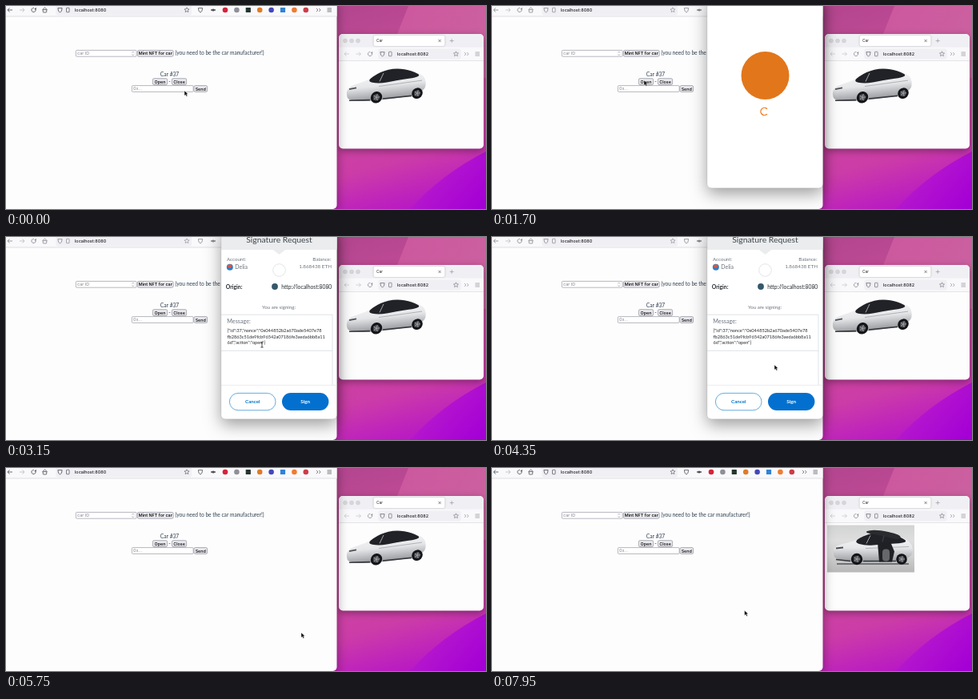
Animation of 600 by 254 pixels, one loop 8000 ms. Source, as an HTML page with a canvas:

```html
<!DOCTYPE html>
<html lang="en">
<head>
<meta charset="utf-8">
<title>Car door demo</title>
<style>
html, body { margin: 0; width: 100%; height: 100%; overflow: hidden; background: #fdfdfd; }
canvas { display: block; width: 600px; height: 254px; }
</style>
</head>
<body>
<canvas id="stage"></canvas>
<script>
const W = 600, H = 254, LOOP = 8000, STEP = 50;
const UI = 'Inter, "Liberation Sans", sans-serif';
const ROUND = 'Lato, "Open Sans", sans-serif';
const POPUP_AT = 1300, REQUEST_AT = 1950, SIGNED_AT = 5450, OPEN_AT = 6400;
const canvas = document.getElementById('stage');
const g = canvas.getContext('2d');
const dpr = window.devicePixelRatio || 1;
canvas.width = W * dpr;
canvas.height = H * dpr;

// The pointer glides to each stop between the two times
const START = { x: 223, y: 106 };
const GLIDES = [
  { from: 200, to: 750, x: 190, y: 93 },
  { from: 1750, to: 2900, x: 320, y: 135 },
  { from: 3400, to: 4150, x: 353, y: 160 },
  { from: 4400, to: 5000, x: 369, y: 206 },
  { from: 7200, to: 8000, x: 315, y: 178 }
];

function shape(fill, stroke, width = 0.7) {
  if (fill) { g.fillStyle = fill; g.fill(); }
  if (stroke) { g.strokeStyle = stroke; g.lineWidth = width; g.stroke(); }
}

function box(x, y, w, h, r, fill, stroke, width) {
  g.beginPath();
  g.roundRect(x, y, w, h, r);
  shape(fill, stroke, width);
}

function disc(x, y, r, fill, stroke, width) {
  g.beginPath();
  g.arc(x, y, r, 0, Math.PI * 2);
  shape(fill, stroke, width);
}

function poly(points, fill) {
  g.beginPath();
  points.forEach(([x, y]) => g.lineTo(x, y));
  g.closePath();
  shape(fill);
}

// Closed curve through the midpoints of a polygon
function blob(points, fill) {
  const n = points.length;
  const mid = i => [0, 1].map(k => (points[i % n][k] + points[(i + 1) % n][k]) / 2);
  g.beginPath();
  g.moveTo(...mid(0));
  for (let i = 1; i <= n; i++) g.quadraticCurveTo(...points[i % n], ...mid(i));
  shape(fill);
}

function line(color, width, ...points) {
  g.beginPath();
  points.forEach(([x, y]) => g.lineTo(x, y));
  shape(null, color, width);
}

function text(str, x, y, size, color, family = UI, weight = 400, align = 'left') {
  g.font = `${weight} ${size}px ${family}`;
  g.fillStyle = color;
  g.textAlign = align;
  g.fillText(str, x, y);
}

function shadowed(alpha, blur, dy, draw) {
  g.save();
  g.shadowColor = `rgba(0,0,0,${alpha})`;
  g.shadowBlur = blur * dpr;
  g.shadowOffsetY = dy * dpr;
  draw();
  g.restore();
}

function fade(x0, y0, x1, y1, ...colors) {
  const grad = g.createLinearGradient(x0, y0, x1, y1);
  colors.forEach((c, i) => grad.addColorStop(i / (colors.length - 1), c));
  return grad;
}

function wallpaper() {
  g.fillStyle = fade(450, 0, 520, 254, '#b4468f', '#c24c97', '#cd489e', '#cc3ca8', '#b716c6');
  g.fillRect(405, 0, 195, H);
  poly([[503, 0], [W, 0], [W, 90], [467, 90]], fade(490, 0, W, 40, '#cc589e', '#cb609f'));
  g.beginPath();
  g.moveTo(W, 182);
  g.quadraticCurveTo(545, 210, 505, H);
  g.lineTo(W, H);
  shape(fade(530, 200, 590, H, '#b81bcb', '#a400d6'));
}

function arrow(x, y, dir, color) {
  line(color, 0.8, [x - 3, y], [x + 3, y]);
  line(color, 0.8, [x + dir * 0.5, y - 2.5], [x + dir * 3, y], [x + dir * 0.5, y + 2.5]);
}

function reload(x, y, color) {
  g.beginPath();
  g.arc(x, y, 2.6, -0.4, 4.9);
  shape(null, color, 0.8);
  poly([[x + 0.8, y - 1], [x + 3.2, y - 3.2], [x + 3.2, y - 0.6]], color);
}

function shield(x, y, color) {
  g.beginPath();
  g.moveTo(x - 2.6, y - 2.4);
  g.lineTo(x + 2.6, y - 2.4);
  g.quadraticCurveTo(x + 2.6, y + 2, x, y + 3.2);
  g.quadraticCurveTo(x - 2.6, y + 2, x - 2.6, y - 2.4);
  shape(null, color, 0.8);
}

function star(x, y, color) {
  g.beginPath();
  for (let i = 0; i < 10; i++) {
    const r = i % 2 ? 1.5 : 3.2, a = i * Math.PI / 5 - Math.PI / 2;
    g.lineTo(x + r * Math.cos(a), y + r * Math.sin(a));
  }
  g.closePath();
  shape(null, color, 0.6);
}

function menu(x, y, color) {
  for (const d of [0, 3.2])
    line(color, 0.7, [x + d - 3, y - 2], [x + d - 1, y], [x + d - 3, y + 2]);
  for (const d of [-2, 0, 2]) line(color, 0.7, [x + 10.5, y + d], [x + 16, y + d]);
}

function addressBar(url, x, y, w, ink) {
  box(x, y - 6.5, w, 13, 2, '#f0f0f4');
  shield(x + 5, y, ink);
  box(x + 13, y - 2.7, 3.6, 5.4, 0.6, null, ink);
  text(url, x + 23.5, y + 2.1, 5.45, '#1c1b22', UI, 500);
  star(x + w - 6, y, ink);
}

function button(label, x, y, w) {
  box(x + 0.4, y + 0.4, w - 0.8, 7.8, 1.6, '#e9e9ed', '#8f8f9d');
  text(label, x + w / 2, y + 6.3, 5.4, '#000', UI, 500, 'center');
}

function field(hint, x, y, w) {
  box(x + 0.4, y + 0.4, w - 0.8, 7.8, 1, '#fff', '#9a9aa6');
  text(hint, x + 2, y + 6.2, 5.4, '#85858a');
}

function extensions() {
  const colors = ['#d5233b', '#8e8f97', '#25352f', '#e07a26', '#4546b8', '#2f83d6', '#f07b32', '#cd3b48'];
  colors.forEach((color, i) => {
    const x = 274 + i * 14.4;
    if (i % 3 === 2) box(x - 3.1, 1.9, 6.2, 6.2, 0.7, color);
    else disc(x, 5, 3.3, color);
  });
}

function mainWindow(t) {
  const focused = t < POPUP_AT || t >= SIGNED_AT;
  const ink = focused ? '#4b4a55' : '#85848d', dim = '#b9b9be', slate = '#2c3e50';
  shadowed(0.4, 14, 4, () => box(-10, -10, 423.5, 264, 5, '#fdfdfd'));
  box(0, 0, 413.5, 13, 0, '#f9f9fb');
  line('#d3d3d7', 0.7, [0, 13], [413.5, 13]);
  arrow(5, 5, -1, ink);
  arrow(20, 5, 1, dim);
  reload(34.5, 5, ink);
  line(ink, 0.8, [45.2, 5], [48.5, 2], [51.8, 5]);
  box(46.3, 4.6, 4.4, 3.4, 0.5, null, ink, 0.8);
  addressBar('localhost:8080', 62.5, 5, 169.5, ink);
  shield(243, 5, ink);
  line(ink, 1.4, [256, 5], [262, 5]);
  disc(259, 5, 1.6, ink);
  extensions();
  menu(391, 5, ink);

  field('car ID', 87, 55, 76.5);
  for (const d of [-1, 1])
    line('#777', 0.6, [157.5, 59.4 + d], [158.8, 59.4 + d * 2.3], [160.1, 59.4 + d]);
  button('Mint NFT for car', 164, 55, 45.5);
  text('(you need to be the car manufacturer!)', 211.5, 61.4, 6.6, slate, ROUND);
  text('Car #37', 204.5, 87.8, 6.65, slate, ROUND, 400, 'center');
  button('Open', 183, 90.3, 19);
  text('-', 204.6, 97, 6.65, slate, ROUND, 400, 'center');
  button('Close', 207, 90.3, 19);
  field('0x...', 157, 99.2, 77.5);
  button('Send', 234.5, 99.2, 17.5);
}

function wheel(x, y, r) {
  disc(x, y, r, '#131417');
  disc(x, y, r * 0.55, '#55575c');
  for (let i = 0; i < 5; i++) {
    const a = i * Math.PI * 0.4;
    line('#b5b7ba', 0.7, [x, y], [x + r * 0.6 * Math.cos(a), y + r * 0.6 * Math.sin(a)]);
  }
}

// Side view facing left: nose at x = 0, ground at y = 0
function carBody(front, rear) {
  blob([[-1, -16], [3, -24], [28, -29], [42, -39], [62, -42], [84, -35], [100, -25], [97, -5], [40, -2], [2, -5]],
    fade(0, -38, 0, -3, '#f6f6f7', '#e6e7e9', '#97999e'));
  blob([[24, -28], [42, -38], [62, -41], [82, -35], [95, -27], [60, -25], [40, -23]], '#202227');
  line('#d9dadc', 0.7, [46, -36], [41, -26]);
  line('#8b8d92', 0.6, [40, -20], [94, -22]);
  line('#36383d', 1.6, [3, -6], [front - 8, -4]);
  line('#36383d', 1.6, [front + 8, -4], [rear - 7, -4]);
  line('#4c4f55', 1.8, [3, -20], [12, -21]);
  wheel(front, -6.5, 7.2);
  wheel(rear, -6.5, 6.8);
}

function closedCar() {
  g.save();
  g.transform(1, -0.1, 0, 1, 426, 124.5);
  carBody(37, 88);
  g.restore();
}

function openCar() {
  box(419, 71.5, 109, 59, 0, fade(0, 71, 0, 130, '#d2d3d3', '#dedede', '#d0d0d0', '#b8b8b8'));
  g.save();
  g.translate(427, 120.5);
  line('#707174', 2, [4, -0.5], [94, -0.5]);
  carBody(29, 85);
  poly([[55, -27], [71, -28], [76, -16], [73, -3], [57, -3]], '#202124');
  box(61, -19, 9, 15, 4, '#65676a');
  blob([[36, -40], [52, -44], [85, -37], [82, -30], [60, -36]], '#292b2e');
  line('#37393c', 1.4, [63, -36], [61, -28]);
  g.restore();
}

function carWindow(t) {
  const ink = '#8f8e97', dim = '#c8c8cc';
  shadowed(0.35, 10, 3, () => box(416, 35, 181, 143.5, 5, '#fdfdfd'));
  box(416, 35, 181, 17, [5, 5, 0, 0], '#f0f0f4');
  box(416, 51.5, 181, 17, 0, '#f9f9fb');
  line('#d6d6da', 0.6, [416, 68.5], [597, 68.5]);
  for (const x of [424, 432, 440]) disc(x, 43.5, 2.5, '#d7d6da', '#c5c4c9', 0.4);
  shadowed(0.3, 2, 0, () => box(459.5, 37, 89, 13, 2, '#fff'));
  text('Car', 463, 45.4, 4.8, '#24232b');
  for (const d of [-1.6, 1.6]) {
    line('#55545d', 0.7, [540.5, 43.5 - d], [543.7, 43.5 + d]);
  }
  line(ink, 0.6, [554.7, 43.5], [559.7, 43.5]);
  line(ink, 0.6, [557.2, 41], [557.2, 46]);
  arrow(426, 60, -1, dim);
  arrow(440.5, 60, 1, dim);
  reload(455, 60, ink);
  addressBar('localhost:8082', 465.5, 60, 103, '#6c6b75');
  menu(576, 60, ink);
  t < OPEN_AT ? closedCar() : openCar();
}

function loading(t) {
  disc(341.5, 87, 30, '#e2761b');
  const turn = (t - 1700) / 1000 * Math.PI * 2;
  g.beginPath();
  g.arc(340.5, 132, 4.6, turn + 0.75, turn + Math.PI * 2 - 0.75);
  shape(null, '#f07c21', 1.4);
}

function request() {
  const grey = '#6a737d', dark = '#24292e', rule = '#d2d8dd', band = '#eaecee';
  box(269, 0, 144.5, 16, 0, band);
  poly([[333.5, 15.8], [349.5, 15.8], [341.5, 22]], band);
  text('Signature Request', 341.5, 7, 10.4, '#3f454b', ROUND, 400, 'center');
  text('Account:', 276, 29.8, 6.2, grey, ROUND);
  text('Balance:', 406.5, 29.8, 6.3, grey, ROUND, 400, 'right');
  disc(279.8, 37.8, 4, '#2d7fc4');
  poly([[276, 36.5], [279.5, 33.8], [283, 36], [280, 39]], '#e2553d');
  text('Delia', 286.3, 40.4, 6.9, grey, ROUND);
  text('1.868438 ETH', 407, 38.6, 6.3, grey, ROUND, 400, 'right');
  disc(341.5, 41.5, 7.8, '#fff', '#d6d9dc');
  text('Origin:', 274.8, 64.5, 6.8, dark, ROUND, 700);
  disc(336, 62, 3.9, '#35586b');
  text('http://localhost:8080', 407.3, 64.5, 6.83, dark, ROUND, 400, 'right');
  text('You are signing:', 341, 90, 6.15, grey, ROUND, 400, 'center');
  line(rule, 0.7, [269, 97.2], [408, 97.2], [408, 185.2]);
  line(rule, 0.7, [269, 142.3], [408, 142.3]);
  line('#e3e6e9', 0.7, [269, 185.4], [413.5, 185.4]);
  text('Message:', 276.3, 108, 7.2, grey, ROUND);
  const message = [
    '{"id":37,"nonce":"0x044852b2a670ade5407e78',
    'fb2863c51de9fcb96542a07186fe3aeda6bb8a11',
    '6d","action":"open"}'
  ];
  message.forEach((row, i) => text(row, 276.5, 118.8 + i * 7.7, 5.65, dark, ROUND));
  box(279.4, 195.4, 57.6, 21.4, 10.7, '#fff', '#3d97d8', 0.8);
  text('Cancel', 308.3, 208.3, 6.2, '#0376c9', ROUND, 700, 'center');
  box(345, 195, 58.4, 22, 11, '#0370cf');
  text('Sign', 374.2, 208.3, 6.3, '#fff', ROUND, 700, 'center');
}

function popup(t) {
  const frame = (fill, stroke) => box(269, -12, 144.5, 239.8, 5, fill, stroke, 0.5);
  shadowed(0.38, 20, 7, () => frame('#fff'));
  t < REQUEST_AT ? loading(t) : request();
  frame(null, 'rgba(0,0,0,.14)');
}

function pointer(t) {
  let { x, y } = START;
  for (const stop of GLIDES) {
    const k = Math.min(1, Math.max(0, (t - stop.from) / (stop.to - stop.from)));
    const ease = k * k * (3 - 2 * k);
    x += (stop.x - x) * ease;
    y += (stop.y - y) * ease;
  }
  return { x, y };
}

function cursor(t) {
  const { x, y } = pointer(t);
  const signing = t >= REQUEST_AT && t < SIGNED_AT;
  g.save();
  g.translate(x, y);
  if (signing && x > 276 && y > 112 && y < 138) {
    line('#222', 0.8, [0, -3], [0, 3]);
    for (const d of [-3, 3]) line('#222', 0.8, [-1.6, d], [1.6, d]);
  } else {
    poly([[0, 0], [0, 6.2], [1.5, 4.9], [2.6, 7.2], [3.8, 6.6], [2.7, 4.4], [4.6, 4.3]], '#000');
    shape(null, 'rgba(255,255,255,.85)', 0.5);
  }
  g.restore();
}

function draw() {
  const t = Math.floor(performance.now() % LOOP / STEP) * STEP;
  g.setTransform(dpr, 0, 0, dpr, 0, 0);
  wallpaper();
  carWindow(t);
  mainWindow(t);
  if (t >= POPUP_AT && t < SIGNED_AT) popup(t);
  cursor(t);
  requestAnimationFrame(draw);
}
draw();
</script>
</body>
</html>
```
